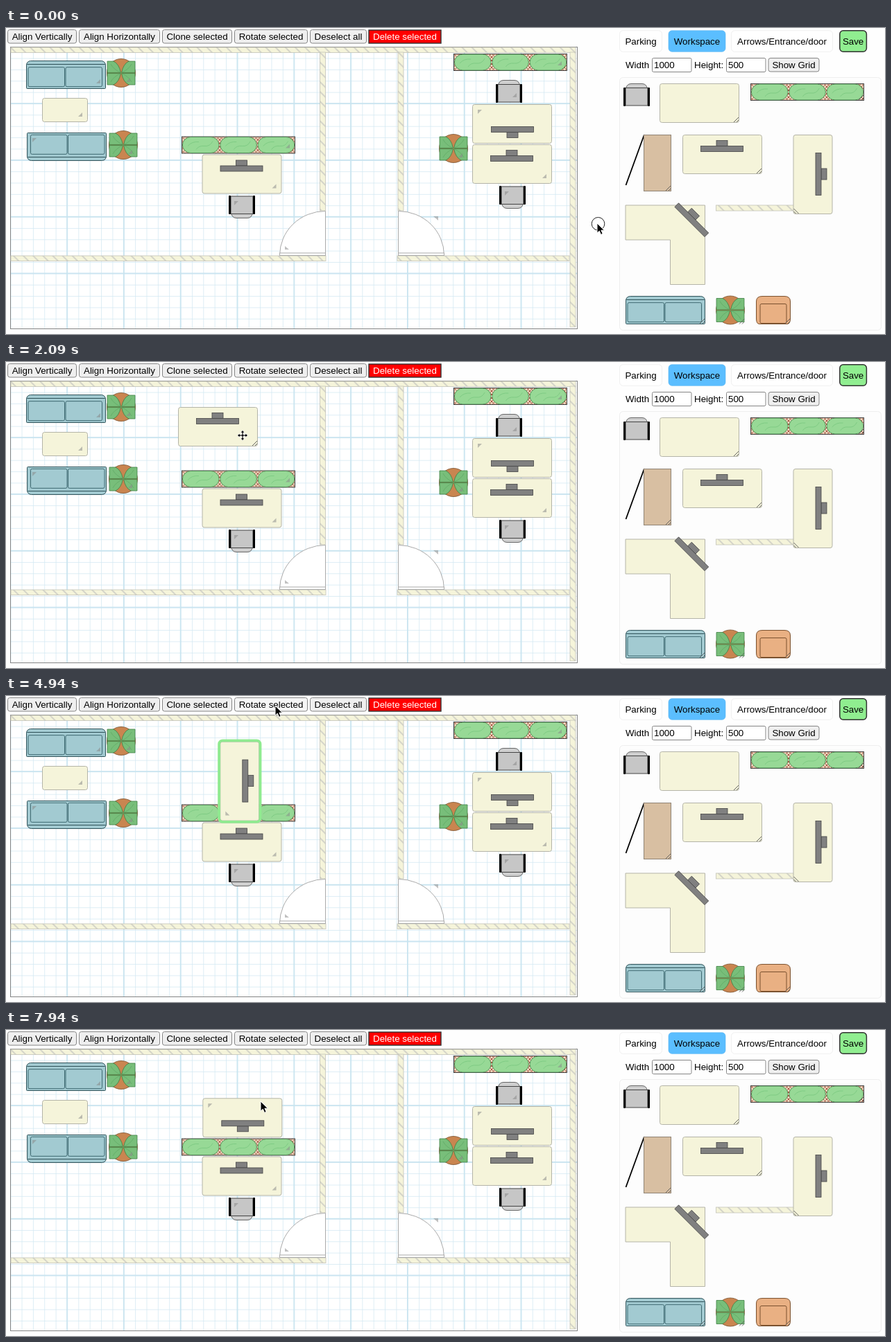
These frames come from a looping animation (1267 by 442 pixels, 8 s). An HTML page:

```html
<!DOCTYPE html>
<html lang="en">
<head>
<meta charset="utf-8">
<title>Floor planner</title>
<style>
  html, body { margin: 0; width: 100%; height: 100%; overflow: hidden; background: #fefefe; }
  svg { display: block; font: 13.333px "Liberation Sans", Arial, sans-serif; }
</style>
</head>
<body>
<svg id="stage" width="1267" height="442" xmlns="http://www.w3.org/2000/svg"></svg>
<script>
const CREAM = '#f5f4da', LINE = '#b4b4a8', GREY = '#808080', TEAL = '#a2cad1', ORANGE = '#e9b083';
const CELL = 16.36; // grid step; every fifth line is bold

const rect = (x, y, w, h, fill, stroke = 'none', r = 0, sw = 1) =>
  `<rect x="${x}" y="${y}" width="${w}" height="${h}" rx="${r}" fill="${fill}" stroke="${stroke}" stroke-width="${sw}"/>`;
const path = (d, fill, stroke = 'none', sw = 1) =>
  `<path d="${d}" fill="${fill}" stroke="${stroke}" stroke-width="${sw}"/>`;
const text = (s, x, y, fill = '#000', anchor = 'middle') =>
  `<text x="${x}" y="${y}" fill="${fill}" text-anchor="${anchor}">${s}</text>`;
const group = (transform, art) => `<g transform="${transform}">${art}</g>`;
const board = (w, h) => rect(.5, .5, w - 1, h - 1, CREAM, LINE, 3);

// Corner handles: striped in the palette, solid on the plan
const grip = (w, h) => path(`M${w - 8} ${h - 1}L${w - 1} ${h - 8}M${w - 4} ${h - 1}L${w - 1} ${h - 4}`, 'none', '#555', .9);
const wedge = (w, h) => path(`M${w - 14} ${h - 8}L${w - 8} ${h - 14}V${h - 8}Z`, '#8888');
const noHandle = () => '';

// Screen bar centred on 0,0 with its stand above
const monitor = (standX = 0) =>
  rect(standX - 8, -12, 16, 8, GREY, '#444', 0, .8) + rect(-30.5, -4, 61, 8, GREY, '#444', 0, .8);

function plant() {
  const leaf = path('M.6 .6H20V17H11Q3 13 .6 .6Z', '#78be7a', '#3f7f46', .8) +
    path('M.6 .6Q11 5 15 13', 'none', '#5da663', .7);
  let s = '<circle r="20.5" fill="#c98550" stroke="#7a512f" stroke-width=".8"/>';
  for (const sx of [-1, 1]) for (const sy of [-1, 1]) s += group(`scale(${sx} ${sy})`, leaf);
  return group('translate(21 21)', s);
}

function planter() {
  let s = rect(.5, .5, 163, 24, 'url(#bricks)', '#444');
  for (let i = 0; i < 3; i++) {
    s += group(`translate(${1 + i * 54.3} 0)`, rect(.5, 1, 52.5, 23, '#97d996', '#4a8d53', 12, .8) +
      path('M8 14Q14 7 24 8M20 19Q24 13 32 14T44 7', 'none', '#7fcb84'));
  }
  return s;
}

const sofa = rect(.5, .5, 114, 12, TEAL, '#2f5259', 6) + rect(.5, 5.5, 114, 35, TEAL, '#2f5259', 1) +
  [3, 57].map(x => rect(x, 9.7, 52.5, 28, TEAL, '#3d6870', 2)).join('');

const armchair =
  path('M.5 33V8Q.5 .5 9 .5H41Q49.5 .5 49.5 8V33Q49.5 40.5 45 40.5H5Q.5 40.5 .5 33Z', ORANGE, '#7a512f') +
  rect(6, 11.5, 38, 28, ORANGE, '#7a512f', 2);

const chair = path('M3 10Q4 .5 11 .5H27Q34 .5 35 10Z', '#cfcfcf', '#666') +
  rect(3, 6.5, 32, 25.5, '#c6c6c6', '#444') + [0, 35].map(x => rect(x, 6, 3, 27, '#000', 'none', 1)).join('');

// name: [width, height, markup]
const shapes = {
  desk: [115, 57, board(115, 57) + group('translate(57 20.5)', monitor())],
  table: [115, 57, board(115, 57)],
  coffee: [66, 35, board(66, 35)],
  sofa: [115, 41, sofa],
  armchair: [50, 41, armchair],
  plant: [42, 42, plant()],
  chair: [38, 33, chair],
  planter: [164, 25, planter()],
  cabinet: [40, 82, rect(.5, .5, 39, 81, '#d8bfa2', '#8f8374')]
};

// x, y: top left corner as seen, turn in quarter steps
function put(name, x, y, turn = 0, handle = wedge) {
  const [w, h, art] = shapes[name];
  const [bw, bh] = turn % 2 ? [h, w] : [w, h];
  return group(`translate(${x + bw / 2} ${y + bh / 2}) rotate(${turn * 90}) translate(${-w / 2} ${-h / 2})`,
    art + handle(w, h));
}

const wall = (x, y, w, h) => rect(x, y, w, h, CREAM) + rect(x, y, w, h, 'url(#hatch)', '#c3c3b8', 0, .8);
const door = path('M.5 64.5A66 64 0 0 1 66.5 .5V64.5Z', '#fff', '#aaa') + rect(.5, 61, 66, 3.5, '#fff', '#aaa');
const button = (s, x, w, y = 2.5, id = '') => `<g id="${id}">` +
  rect(x + .5, y, w, 19.5, '#efefef', '#858585', 3) + '</g>' + text(s, x + .5 + w / 2, y + 14.7);
const input = (s, x) => rect(x, 43.5, 56.5, 20, '#fff', '#858585', 2) + text(s, x + 2.5, 58.2, '#000', 'start');
const tab = (s, x, w, fill = '#fff', stroke = '#f0f0f0', sw = 1) =>
  rect(x, 3.7, w, 30.6, fill, stroke, 5, sw) + text(s, x + w / 2, 23.7);

const lines = (id, step, width, color) =>
  `<pattern id="${id}" patternUnits="userSpaceOnUse" x="${7 - width}" y="${28 - width}" width="${step}" height="${step}">` +
  path(`M0 ${width / 2}H${step}M${width / 2} 0V${step}`, 'none', color, width) + '</pattern>';

const defs = '<defs>' + lines('fine', CELL, .82, '#d2e9f3') + lines('bold', CELL * 5, 1.64, '#c8e4f0') +
  `<pattern id="hatch" patternUnits="userSpaceOnUse" width="10" height="10" patternTransform="rotate(-45)">
    ${path('M5 0V10', 'none', '#cfcfc6', 1.7)}</pattern>
  <pattern id="bricks" patternUnits="userSpaceOnUse" width="5" height="5">
    ${rect(0, 0, 5, 5, '#ecd9c0') + path('M0 0L2.5 2.5L5 0M0 5L2.5 2.5L5 5', 'none', '#a4503f')}</pattern></defs>`;

const toolbar =
  button('Align Vertically', 2, 99) + button('Align Horizontally', 105, 116) +
  button('Clone selected', 225, 100) + button('Rotate selected', 329, 105, 2.5, 'rotate') +
  button('Deselect all', 438, 81, 2.5, 'deselect') +
  rect(523, 3, 104, 19, '#f00', '#333', 0, 1.4) + text('Delete selected', 575, 17.2, '#fff');

const plan =
  ['#fff', 'url(#fine)', 'url(#bold)'].map(f => rect(6.5, 27.5, 817, 407, f, '#858585')).join('') +
  wall(7, 28, 814, 7.5) + wall(813, 35, 8, 397) + wall(452.5, 35, 8, 229) + wall(565, 35, 8, 229) +
  wall(7, 329, 454, 7.5) + wall(564, 329, 248, 7.5) +
  group('translate(394 264)', door + path('M8 56V51L14 56Z', '#8888')) +
  group('translate(632 264) scale(-1 1)', door + path('M9 8H16L9 14Z', '#8888')) +
  put('sofa', 29, 47) + put('plant', 145, 44) + put('coffee', 52, 101) +
  put('sofa', 30, 151, 2) + put('plant', 148, 148) +
  put('planter', 253, 156.5) + put('desk', 282.5, 182.5) + put('chair', 321, 242, 2) +
  put('planter', 645, 37) + put('chair', 706, 75) +
  put('desk', 672, 110, 2) + put('desk', 672, 168) + put('plant', 624, 153) + put('chair', 711, 228, 2);

const palette =
  tab('Parking', 884.5, 61) + tab('Workspace', 955, 82, '#5bbeff', '#58b4f0', .6) +
  tab('Arrows/Entrance/door', 1045.5, 146) + tab('Save', 1201.8, 38.6, '#90ee90', '#333', 1.5) +
  text('Width', 893, 58.2, '#000', 'start') + input('1000', 931.5) +
  text('Height:', 992, 58.2, '#000', 'start') + input('500', 1038.5) +
  button('Show Grid', 1098.5, 73, 43.5) +
  rect(884.5, 71.5, 377, 365, '#fdfdfd', '#eeeeee', 5) +
  put('chair', 890, 80, 0, noHandle) + put('table', 942, 80, 0, grip) + put('planter', 1073, 80, 0, grip) +
  path('M920 154L893.5 227', 'none', '#000', 1.8) + put('cabinet', 919, 154, 0, grip) +
  put('desk', 975, 154, 0, grip) + wall(1023.5, 256, 112, 8) + put('desk', 1134.5, 154, 1, grip) +
  path('M893 256H1007.5V370.5H957.5V306H893Z', CREAM, LINE) +
  group('translate(988.3 277.2) rotate(45)', monitor(-4)) +
  put('sofa', 893, 387, 0, grip) + put('plant', 1023, 386.5, 0, grip) + put('armchair', 1081, 387, 0, grip);

const cursors =
  '<circle id="ring" cx="853.5" cy="282.8" r="9.3" fill="none" stroke="#222"/>' +
  `<g id="arrow">${path('M0 0V14.2L3.3 11.2L5.6 16.4L8.2 15.3L5.9 10.2H10.4Z', '#000', '#fff')}</g>` +
  `<g id="move">${path('M0-7.5L3-4H1V-1H4V-3L7.5 0L4 3V1H1V4H3L0 7.5L-3 4H-1V1H-4V3L-7.5 0L-4-3V-1H-1V-4H-3Z', '#000', '#fff', .8)}</g>`;

document.getElementById('stage').innerHTML = defs + toolbar + plan + palette + '<g id="item"></g>' + cursors;

const $ = id => document.getElementById(id);
const LOOP = 8000, STEP = 150;
const GRAB = 1490, DROP = 2840, SELECT = 3740, TURN = 4340, LAST_TURN = 5390, DESELECT = 6140;
const NUDGE = 6740, REST = 7640;
const LAG = STEP / 2; // the dragged desk trails the pointer
const HOME = { x: 279.3, y: 94.6 };

// Stops of the pointer: leave at, arrive at, place
const stops = [
  [0, 0, 852, 282], [0, 1190, 1069, 200], [1340, GRAB, 1026, 234], [GRAB, 1640, 761.5, 206.5],
  [1640, 2000, 341, 106], [2090, 2300, 365, 125], [2390, DROP, 365.5, 137.5], [SELECT, TURN, 388, 14],
  [LAST_TURN, 5990, 456, 11], [DESELECT, 6590, 364.5, 103], [NUDGE, REST, 368.5, 106.7], [REST, 7940, 367, 103]];

const clamp = (v, a, b) => Math.min(b, Math.max(a, v));
const smooth = k => k * k * (3 - 2 * k);

function pointer(t) {
  let x = 0, y = 0;
  for (const [from, to, tx, ty] of stops) {
    const k = t >= to ? 1 : smooth(clamp((t - from) / (to - from), 0, 1));
    x += (tx - x) * k;
    y += (ty - y) * k;
  }
  return { x, y };
}

function deskAt(t) {
  if (t < DROP) {
    const p = pointer(t - LAG);
    return { x: p.x - 93, y: p.y - 41 };
  }
  const a = pointer(NUDGE), b = pointer(clamp(t, NUDGE, REST));
  return { x: HOME.x + b.x - a.x, y: HOME.y + b.y - a.y };
}

// Five quick clicks, then one more
const turnsAt = t => (t < TURN ? 0 : Math.min(5, 1 + Math.floor((t - TURN) / STEP))) + (t >= LAST_TURN);

// The picture is held between steps; the rhythm restarts at 1190
const tick = t => {
  const base = t < 1190 ? 0 : 1190;
  return base + Math.floor((t - base) / STEP) * STEP;
};

const show = (el, on) => el.setAttribute('visibility', on ? 'visible' : 'hidden');
const paint = (el, hover, press) =>
  el.firstChild.setAttribute('fill', press ? '#f5f5f5' : hover ? '#e2e2e2' : '#efefef');

let last = -1;
function draw(t) {
  if (t === last) return;
  last = t;
  const p = pointer(t), d = deskAt(t), turn = turnsAt(t), upright = turn % 2 === 1;
  const placed = t >= GRAB, dragging = placed && t < DROP;
  const [w, h] = upright ? [57, 115] : [115, 57];
  const x = d.x + (115 - w) / 2, y = d.y + (57 - h) / 2;

  let art = placed ? put('desk', x, y, turn, dragging ? grip : wedge) : '';
  if (t >= SELECT && t < DESELECT) art += rect(x - 1.2, y - 1.2, w + 2.4, h + 2.4, 'none', '#90ea90', 5, 3.8);
  $('item').innerHTML = art;

  const over = (bx, by, bw, bh) => p.x > bx && p.x < bx + bw && p.y > by && p.y < by + bh;
  const moving = dragging || t < 7940 && (over(975, 154, 115, 57) || placed && over(x, y, w, h));
  show($('ring'), t < STEP);
  show($('arrow'), !moving);
  show($('move'), moving);
  for (const id of ['arrow', 'move']) $(id).setAttribute('transform', `translate(${p.x} ${p.y})`);

  paint($('rotate'), over(329, 2, 105, 20), turn !== turnsAt(t - STEP));
  paint($('deselect'), over(438, 2, 81, 20), t === DESELECT);
}

const start = performance.now();
function frame() {
  draw(tick((performance.now() - start) % LOOP));
  requestAnimationFrame(frame);
}
frame();
</script>
</body>
</html>
```
